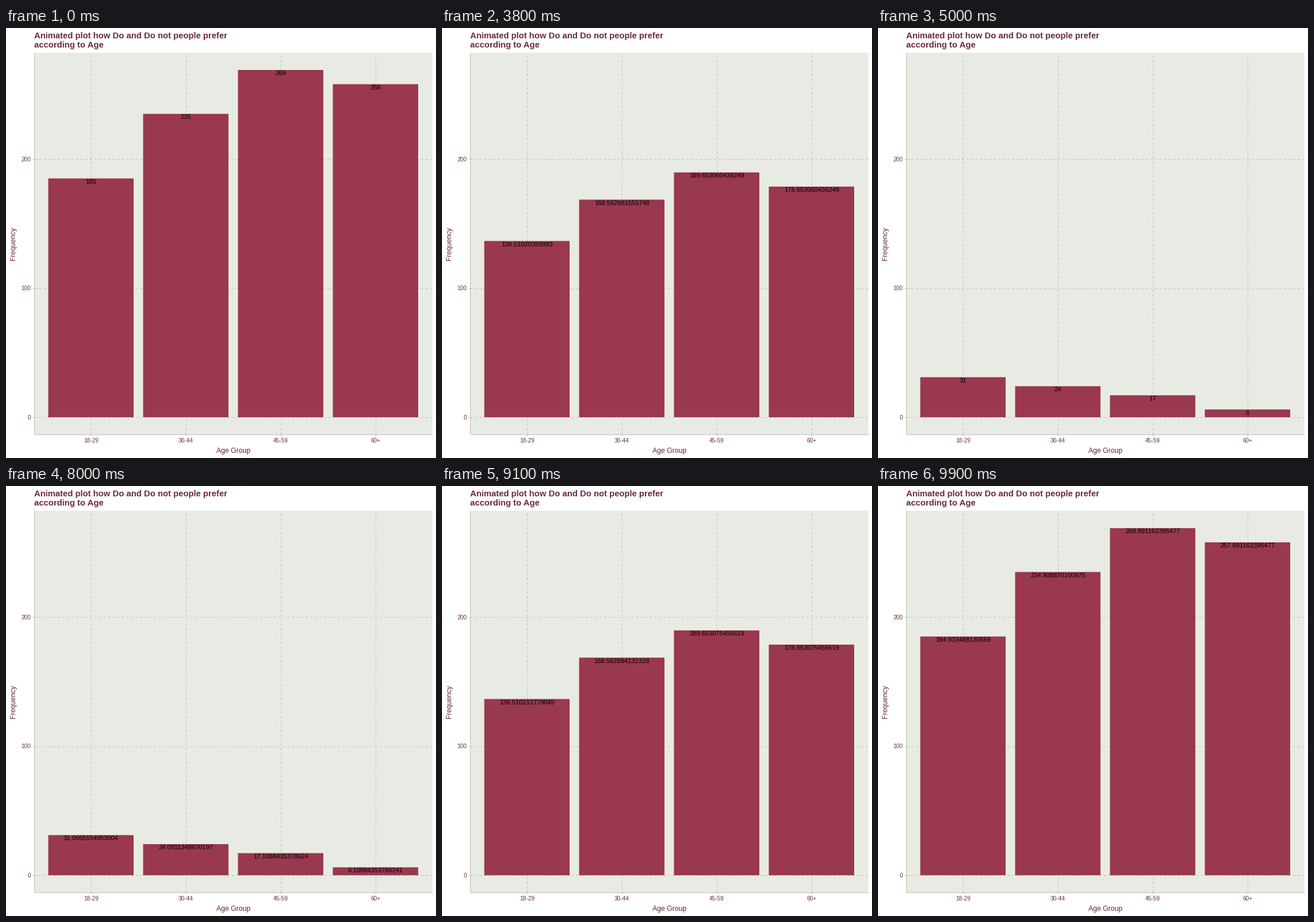
These frames come from a looping animation (748x748 px, 10000 ms). A matplotlib script:

```python
import numpy as np
import matplotlib.pyplot as plt
from matplotlib.animation import FuncAnimation
from matplotlib.patches import Rectangle

SIZE, DPI = 748, 64
PT = 72 / DPI  # points per pixel

PAPER, PANEL, BAR = "#FFFFFF", "#E8EBE4", "#9A3850"
GRID, AXIS = "#BABFB2", "#BDC0AC"
TITLE, LABEL, TICK = "#6B2A3C", "#5F2234", "#6B2F40"

LEFT, TOP, RIGHT, BOTTOM = 48.75, 43, 741.75, 707.3
STEP = 165
ZERO, SCALE = 677.05, 2.2454

GROUPS = ["18-29", "30-44", "45-59", "60+"]
DO = np.array([185.0, 235.0, 269.0, 258.0])
DO_NOT = np.array([31.0, 24.0, 17.0, 6.0])

FRAMES, INTERVAL = 100, 100
HOLD, MOVE = 29, 21

plt.rcParams["font.family"] = "Liberation Sans"
fig = plt.figure(figsize=(SIZE / DPI, SIZE / DPI), dpi=DPI, facecolor=PAPER)
ax = fig.add_axes([0, 0, 1, 1])
ax.set_xlim(0, SIZE)
ax.set_ylim(SIZE, 0)
ax.axis("off")


def y_of(value):
    return ZERO - SCALE * value


def write(x, y, text, size, color, ha="center", **kw):
    return ax.text(x, y, text, fontsize=size * PT, color=color, ha=ha,
                   va="baseline", **kw)


def line(xs, ys, color, **kw):
    ax.plot(xs, ys, color=color, lw=PT, solid_capstyle="butt",
            dash_capstyle="butt", **kw)


def box(x, y, w, h, color, z):
    patch = Rectangle((x, y), w, h, facecolor=color, lw=0, zorder=z)
    patch.set_snap(False)
    return ax.add_patch(patch)


def ease(k):
    """Cubic in-out in single precision, which shows in the last digits."""
    p = np.float32(k / MOVE)
    if p < 0.5:
        return float(np.float32(4) * p * p * p)
    f = float(np.float32(2) * p - np.float32(2))
    return float(np.float32(0.5 * f * f * f + 1))


def values(frame):
    half, pos = divmod(frame, HOLD + MOVE)
    start, end = (DO, DO_NOT) if half == 0 else (DO_NOT, DO)
    return start + (end - start) * ease(max(0, pos - HOLD))


# Panel, grid and axes
box(LEFT, TOP, RIGHT - LEFT, BOTTOM - TOP, PANEL, 0)
centers = [LEFT + STEP * (0.6 + i) for i in range(len(GROUPS))]
dashes = dict(linestyle=(0, (4, 4)), zorder=1)

for v in (0, 100, 200):
    y = y_of(v)
    line([LEFT, RIGHT], [y, y], GRID, **dashes)
    line([LEFT - 3, LEFT], [y, y], AXIS, zorder=4)
    write(43.6, y + 3.6, str(v), 10, TICK, ha="right")

for x, name in zip(centers, GROUPS):
    line([x, x], [BOTTOM, TOP], GRID, **dashes)
    line([x, x], [BOTTOM, BOTTOM + 3], AXIS, zorder=4)
    write(x, 721, name, 10, TICK)

line([LEFT, LEFT], [TOP, BOTTOM], AXIS, zorder=4)
line([LEFT, RIGHT], [BOTTOM, BOTTOM], AXIS, zorder=4)

# Titles
write(49, 18, "Animated plot how Do and Do not people prefer", 14.85, TITLE,
      ha="left", weight="bold")
write(49, 34, "according to Age", 14.85, TITLE, ha="left", weight="bold")
write((LEFT + RIGHT) / 2, 739.3, "Age Group", 12.2, LABEL)
write(16, (TOP + BOTTOM) / 2, "Frequency", 12.3, LABEL, rotation=90,
      rotation_mode="anchor")

# Moving parts
bars = [box(x - 0.45 * STEP, ZERO, 0.9 * STEP, 0, BAR, 2) for x in centers]
counts = [write(x, ZERO, "", 11.15, "black", zorder=5) for x in centers]


def update(frame):
    for bar, count, v in zip(bars, counts, values(frame)):
        top = y_of(v)
        bar.set_y(top)
        bar.set_height(ZERO - top)
        count.set_y(top + 9.1)
        count.set_text(f"{v:.15g}")
    return bars + counts


anim = FuncAnimation(fig, update, frames=FRAMES, interval=INTERVAL,
                     init_func=lambda: update(0), repeat=True,
                     repeat_delay=0, blit=False)
plt.show()
```
